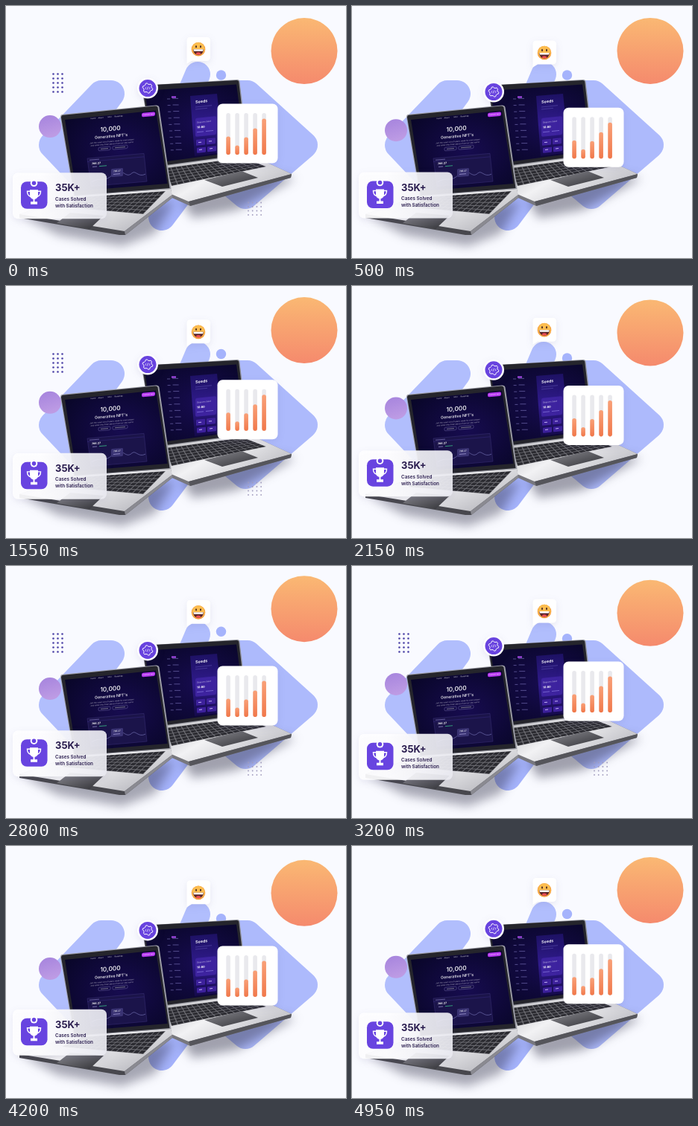
These frames come from a looping animation (456x339 px, 5000 ms). An HTML page:

```html
<!DOCTYPE html>
<html lang="en">
<head>
<meta charset="utf-8">
<style>
  html, body { margin: 0; width: 100%; height: 100%; overflow: hidden; background: #f9faff; }
  svg { display: block; width: 100vw; height: 100vh; font-family: Inter, Lato, sans-serif; }
  .soft { filter: drop-shadow(0 3px 5px rgba(70, 60, 130, .1)); }
  .blur { filter: blur(7px); }
</style>
</head>
<body>
<svg viewBox="0 0 456 339">
  <defs>
    <linearGradient id="orange" x2="0" y2="1"><stop stop-color="#fab873"/><stop offset="1" stop-color="#f58a6d"/></linearGradient>
    <linearGradient id="lilac" x2=".3" y2="1"><stop stop-color="#a583dd"/><stop offset="1" stop-color="#bd9be4"/></linearGradient>
    <linearGradient id="bar" x2="0" y2="1"><stop stop-color="#f9a077"/><stop offset="1" stop-color="#f1784a"/></linearGradient>
    <linearGradient id="glass"><stop offset=".3" stop-color="#fdfdff"/><stop offset="1" stop-color="#e9e9f0"/></linearGradient>
    <linearGradient id="silver" x2="1" y2=".6"><stop stop-color="#a9a9af"/><stop offset=".5" stop-color="#f2f2f4"/><stop offset="1" stop-color="#bcbcc2"/></linearGradient>
    <linearGradient id="pad" x2="1" y2="1"><stop stop-color="#8d8d93"/><stop offset="1" stop-color="#2f2f34"/></linearGradient>
    <radialGradient id="navy" cx=".55" cy=".5" r=".65"><stop stop-color="#170c50"/><stop offset="1" stop-color="#090629"/></radialGradient>
    <linearGradient id="violet" x2="0" y2="1"><stop stop-color="#1d1163"/><stop offset=".5" stop-color="#301b8c"/><stop offset="1" stop-color="#140a4a"/></linearGradient>
  </defs>

  <rect width="456" height="339" fill="#f9faff"/>
  <g stroke-width="36" stroke-linejoin="round" stroke-linecap="round">
    <path d="M128 118 62 187 112 240 110 160 141 118Z" fill="#b1befd" stroke="#b1befd"/>
    <path d="M300 118H324L400 187 321 255 240 187Z" fill="#adbafc" stroke="#adbafc"/>
    <path d="M257 92 241 130" stroke="#b1befd" stroke-width="34"/>
    <path d="M242 240 209 284" stroke="#a5b3fc"/>
  </g>
  <g class="blur" fill="#34344a">
    <path d="M22 282 70 308 155 323 200 306 226 262 150 280Z" opacity=".42"/>
    <path d="M236 262 250 285 310 274 388 232 340 225Z" opacity=".45"/>
  </g>

  <circle id="sun" cx="400" cy="60.5" r="44.5" fill="url(#orange)"/>
  <circle id="bead" cx="288.5" cy="93" r="6.7" fill="#a5b3fc"/>
  <circle id="ball" cx="59" cy="162" r="15" fill="url(#lilac)"/>
  <g id="dots"></g>

  <!-- right laptop -->
  <path d="M205 214 325 199 383 226 382 231 247 269 205 250Z" fill="#77777d"/>
  <path d="M205 214 325 199 383 226 245 263 205 246Z" fill="url(#silver)"/>
  <path d="M245 263 383 226 382 231 247 269Z" fill="#55555b"/>
  <path d="M182 110q0-3 3-3.200L310 99q3 0 3.500 3L325 200 200 217Z" fill="#8f9098"/>
  <path d="M183 110q0-3 3-3.200L309 100q3 0 3.200 2L323.500 199 200 216Z" fill="#25252c"/>
  <path d="M186 114 309 105.500 321 195 200 211Z" fill="url(#navy)"/>
  <path d="M247 121 283 118 291 197 253 202Z" fill="url(#violet)"/>
  <g id="list"></g>
  <g transform="translate(254 131) skewY(-6)" fill="#fff">
    <text font-size="5.400" font-weight="600">Seeds</text>
    <path d="M0 5h22M0 8h16" stroke="#5a4eae" stroke-width=".6"/>
    <rect y="20" width="28" height="25" rx="2" fill="#3d239f"/>
    <text x="2" y="27" font-size="3" opacity=".7">Season chest</text>
    <text x="2" y="34" font-size="4" font-weight="700">10.80</text>
    <path d="M2 39h9M14 39h10" stroke="#8070d8" stroke-width=".8"/>
    <g fill="#3d219b"><rect x="1" y="49" width="12" height="8" rx="1"/><rect x="15" y="49" width="12" height="8" rx="1"/><rect x="2" y="60" width="12" height="7" rx="1"/><rect x="16" y="60" width="12" height="7" rx="1"/></g>
    <path d="M4 53h4M18 53h4M5 63h4M19 63h4" stroke="#c3b4f5"/>
  </g>
  <g id="keysR"></g>
  <path d="M266 234 316 222 338 231 290 243Z" fill="url(#pad)"/>

  <!-- left laptop -->
  <path d="M91 255 221 246 223 258 160 308 152 308 18 285 18 280Z" fill="#48484e"/>
  <path d="M91 255 221 246 223 254 159 303 18 280Z" fill="url(#silver)"/>
  <path d="M159 303 223 254 223 258 160 308Z" fill="#8a8a91"/>
  <path d="M73 149q0-3 3-3.300L201 133.500q4 0 4.500 3L221.500 246 91 256Z" fill="#9d9ea7"/>
  <path d="M74 150q0-3 3-3.300L200 134.500q3 0 3.500 2L219.500 245 92 255Z" fill="#25252c"/>
  <path d="M79 153 201 140.500 216.500 239 94 249Z" fill="url(#navy)"/>
  <g transform="translate(140 165) skewY(-5)" fill="#fff" text-anchor="middle">
    <g font-size="2.500" opacity=".8"><text x="-23" y="-15">Home</text><text x="-13" y="-15">About</text><text x="-1" y="-15">Mint</text><text x="11" y="-15">Roadmap</text></g>
    <rect x="42" y="-17.500" width="18" height="5.500" rx="2" fill="#b737f2"/>
    <text x="51" y="-14" font-size="2.400">Connect now</text>
    <text y="3" font-size="8.400" font-weight="500">10,000</text>
    <text x="1" y="12" font-size="5.300" font-weight="500">Generative NFT's</text>
    <g font-size="2.500" opacity=".65"><text x="2" y="18">Join the rarest set of tokens made for every player</text><text x="2" y="21.500">and collect the finest pieces from our new world</text></g>
    <g fill="#120a45" stroke="#8a80bd" stroke-width=".4"><rect x="-16" y="24" width="16" height="4.500" rx="1.500"/><rect x="3" y="24" width="20" height="4.500" rx="1.500"/></g>
    <path d="M-13 26.300h10M6 26.300h14" stroke="#bbb" stroke-width=".6"/>
  </g>
  <g transform="translate(109 205) skewY(-5)" fill="#fff">
    <path d="M0 0H76L80 38H5Z" fill="#1b144a" stroke="#3c3378" stroke-width=".5"/>
    <path d="M3 2.500h13" stroke="#8278c0" stroke-width=".7"/>
    <path d="M0 4.500H76" stroke="#382d80" stroke-width=".5"/>
    <text x="6" y="9" font-size="3.600" font-weight="700">796.27</text>
    <path d="M7 12h6" stroke="#9d95d2" stroke-width=".7"/><path d="M16 12h10" stroke="#3ccf8d" stroke-width=".7"/>
    <path d="M6 32C17 27 21 32 28 29S39 17 46 22 55 29 60 25 68 32 78 28" fill="none" stroke="#6f6cae" stroke-width=".7"/>
    <rect x="32" y="17" width="16" height="11" rx="1.500" fill="#3a3373"/>
    <text x="35" y="21.500" font-size="3">796.27</text><path d="M35 24.500h9" stroke="#aaa3df" stroke-width=".7"/>
  </g>
  <g id="keysL"></g>
  <path d="M86 278 131 282 112 300 68 292Z" fill="url(#pad)"/>

  <g id="gear" class="soft">
    <circle cx="190" cy="110.500" r="14" fill="#fff"/>
    <circle cx="190" cy="110.500" r="11.500" fill="#6843df"/>
    <g fill="none" stroke="#fff" stroke-linejoin="round">
      <path id="cog" stroke-width="1"/>
      <path d="M188.200 109.200 186.800 110.500 188.200 111.800M191.800 109.200 193.200 110.500 191.800 111.800M190.500 108.700 189.500 112.300" stroke-width=".7"/>
    </g>
  </g>

  <g id="emoji" class="soft">
    <path d="M247 44H269Q274 44 274 49V71Q274 76 269 76H249L242.500 80V49Q242.500 44 247 44Z" fill="#fff"/>
    <circle cx="258" cy="60.500" r="9.300" fill="#f39a3d"/>
    <circle cx="258" cy="59.800" r="8.500" fill="#fcbd4f"/>
    <ellipse cx="255" cy="57" rx="1" ry="1.700" fill="#4b2b25"/><ellipse cx="261" cy="57" rx="1" ry="1.700" fill="#4b2b25"/>
    <path d="M250.800 60.500H265.200Q264 68 258 68T250.800 60.500Z" fill="#5a2428"/>
    <path d="M251.300 60.500H264.700L264 63H252Z" fill="#fff"/>
    <ellipse cx="258" cy="66.300" rx="3" ry="1.600" fill="#ee4f55"/>
  </g>

  <g id="chart" class="soft">
    <rect x="283.500" y="131.500" width="81" height="80" rx="7" fill="#fff"/>
    <g id="bars"></g>
  </g>

  <g id="card" class="soft">
    <rect x="9" y="222" width="126" height="62" rx="7" fill="url(#glass)" opacity=".93"/>
    <rect x="20" y="234" width="35.500" height="36.500" rx="8" fill="#6844e0"/>
    <circle cx="37.500" cy="236" r="4.800" fill="#fff"/><circle cx="37.500" cy="236" r="2.800" fill="#6844e0"/>
    <path d="M32 245H43V252Q43 257 37.500 258 32 257 32 252ZM36.500 257H38.500V261H36.500ZM33 261H42V264.500H33Z" fill="#fff"/>
    <path d="M32 247H28.500Q28.500 253 33 254M43 247H46.500Q46.500 253 42 254" fill="none" stroke="#fff" stroke-width="1.400"/>
    <g fill="#2a1d4f">
      <text x="66" y="247" font-size="13" font-weight="700">35K+</text>
      <g font-size="6.300" font-weight="600"><text x="66" y="259.500">Cases Solved</text><text x="66" y="268.500">with Satisfaction</text></g>
    </g>
  </g>
</svg>
<script>
const el = id => document.getElementById(id);
const fill = (id, html) => { el(id).innerHTML = html; };
const times = (n, f) => Array.from({ length: n }, (_, i) => f(i)).join('');

const dotGrid = (x, y, cols, rows, dx, dy, r, color) =>
  times(cols * rows, i =>
    `<circle cx="${x + i % cols * dx}" cy="${y + Math.floor(i / cols) * dy}" r="${r}" fill="${color}"/>`);

// Bilinear point inside a quad given clockwise from its back left corner.
function pointIn([a, b, c, d], u, v) {
  return [0, 1].map(k =>
    ((a[k] * (1 - u) + b[k] * u) * (1 - v) + (d[k] * (1 - u) + c[k] * u) * v).toFixed(2)).join();
}

function keyboard(quad, cols, rows) {
  return `<polygon points="${quad.join(' ')}" fill="#6c6c72"/>` + times(cols * rows, i => {
    const c = i % cols, r = Math.floor(i / cols);
    const corners = [[.08, .1], [.9, .1], [.9, .88], [.08, .88]]
      .map(([x, y]) => pointIn(quad, (c + x) / cols, (r + y) / rows));
    return `<polygon points="${corners.join(' ')}" fill="#2a2a30"/>`;
  });
}

fill('dots', dotGrid(63.5, 91.5, 3, 5, 6, 6, 1.3, '#4b41a6') +
  dotGrid(325, 264.5, 4, 4, 5.7, 5.5, .9, '#a19cbd'));
fill('keysR', keyboard([[214, 218], [318, 204], [349, 216], [222, 242]], 15, 6));
fill('keysL', keyboard([[103, 257], [214, 249], [184, 280], [75, 270]], 15, 6));
fill('list', times(9, i => {
  const x = 216 + i * .6, y = 125 + i * 8.6;
  return `<path d="M${x} ${y}h4M${x + 7} ${y - .6}h8" stroke="#7c74bd" stroke-width=".9" opacity=".7"/>`;
}) + '<path d="M222 122.500h6" stroke="#b04df5" stroke-width="2"/>');
fill('bars', [44, 56, 45, 33, 20].map((top, i) => {
  const x = 295.3 + i * 12;
  return `<rect x="${x}" y="144" width="5.600" height="56" rx="2.800" fill="#e9e9ed"/>
    <rect x="${x}" y="${131.5 + top}" width="5.600" height="${68.5 - top}" rx="2.800" fill="url(#bar)"/>`;
}).join(''));

const cog = [];
for (let i = 0; i < 24; i++) {
  const a = (i + .5) * Math.PI / 12, r = i % 4 < 2 ? 6.8 : 5.4;
  cog.push(`${190 + r * Math.cos(a)} ${110.5 + r * Math.sin(a)}`);
}
el('cog').setAttribute('d', `M${cog.join('L')}Z`);

// id, period in seconds, amplitude in pixels, phase in turns
const floats = [
  ['sun', 1, 3, 0],
  ['bead', 1, 5, 0],
  ['card', 1.5, 3.8, .1],
  ['emoji', 1.2, 2.5, -.2],
  ['chart', 2, 5.2, 0],
  ['gear', 2, 5, 0],
  ['ball', 2, 5.2, 0],
];

function draw(now) {
  const t = now % 5000 / 1000;
  for (const [id, period, amp, phase] of floats) {
    const y = amp * Math.sin(2 * Math.PI * (t / period + phase));
    el(id).setAttribute('transform', `translate(0 ${y.toFixed(2)})`);
  }
  const blink = t / 1.5 % 1;
  el('dots').style.display = blink < .2 || blink > .82 ? '' : 'none';
  requestAnimationFrame(draw);
}
draw(0);
</script>
</body>
</html>
```
